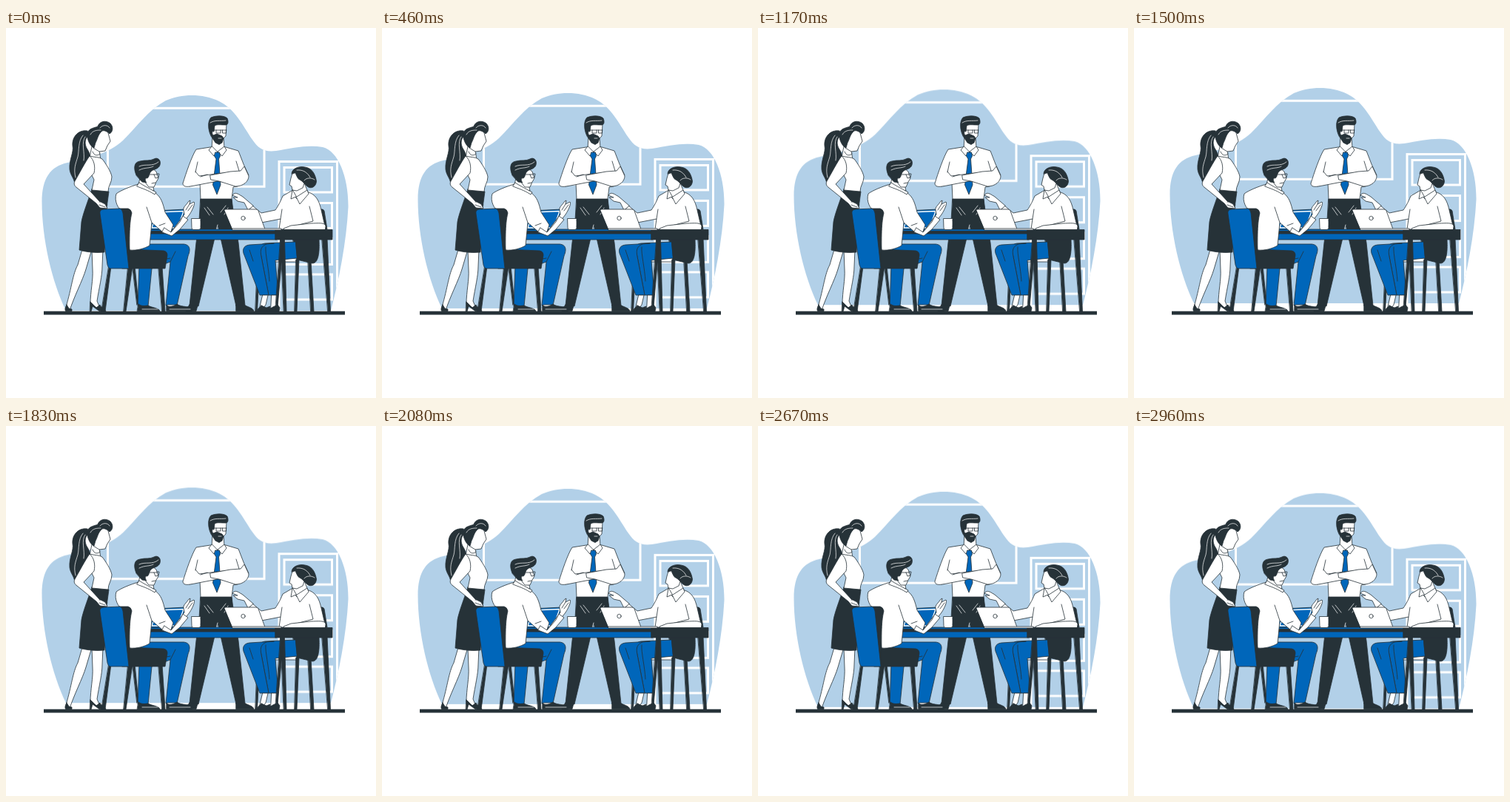
An HTML page that plays this animation: 500 by 500 pixels, repeating every 3000 ms.

```html
<!DOCTYPE html>
<html lang="en">
<head>
<meta charset="utf-8">
<title>Team meeting</title>
<style>
html, body { margin: 0; width: 100%; height: 100%; overflow: hidden; background: #fff; }
svg { display: block; width: 100vw; height: 100vh; }
.room { animation: float 3s linear infinite; }
@keyframes float { 50% { transform: translateY(-10px); } }
.trim { fill: none; stroke: #fff; stroke-width: 3; }
.w, .d, .b, .l { stroke: #263238; stroke-width: .8; stroke-linejoin: round; stroke-linecap: round; }
.w { fill: #fff; }
.d { fill: #263238; }
.b { fill: #0066ba; }
.l { fill: none; }
.h { fill: none; stroke: #fff; stroke-width: .7; stroke-linecap: round; }
</style>
</head>
<body>
<svg viewBox="0 0 500 500">
<defs>
  <clipPath id="cloud"><path id="blob" d="M81 382C62 343 48.500 285 48.500 235C48.500 203 60 187 83 182C112 176 138 170 158 152C178 132 192 111 216 98C238 88.500 266 88.500 288 99C310 110 320 132 333 151C341 163 349 168 365 166C388 162 408 157.500 428 161C449 166 463 202 462.500 242C460 290 450 340 439 382Z"/></clipPath>
</defs>

<g class="room">
  <use href="#blob" fill="#b2d0e8"/>
  <g class="trim" clip-path="url(#cloud)">
    <rect x="137.500" y="108.300" width="211.500" height="106"/>
    <path d="M369 384V180.500H447.500V384"/>
    <rect x="376" y="188.500" width="64.500" height="33.500"/>
    <rect x="376" y="236.500" width="64.500" height="34"/>
    <rect x="376" y="284.500" width="64.500" height="35"/>
    <rect x="376" y="333" width="64.500" height="34"/>
  </g>
</g>

<rect x="51" y="382.700" width="407" height="4.800" fill="#263238"/>

<!-- standing man -->
<g>
  <path class="d" d="M263 231H305L309 262L314 290L323 375L311 376L291 288L286 266L281 288L260 376L248 375L257 290L261 260Z"/>
  <path class="d" d="M248 374L259 375L257 382.500H243C241 378 246 378 248 374ZM311 374L322 374C326 377 334 378 335 382.500H311Z"/>
  <path class="h" d="M268 243L275 253M272 242L280 252M297 240L290 249M300 243L295 252M286 266L284 273"/>
  <path class="w" d="M276 161L257 164C251 173 243 197 239 210L248 214L262 209L263 231H305L307 215L313 214L328 199L321 184L314 166L297 161Z"/>
  <path class="w" d="M279 146L278 163L286 169L295 162L294 148Z"/>
  <path class="w" d="M278 130L279 147L288 155L297 146L298 130Z"/>
  <path class="d" d="M277 146C273 138 272 126 277 121C284 118 295 118 299 122C301 127 300 131 297 131C290 131 285 130 282 132L281 140C278 139 277 142 280 145L285 143L292 146L294 149L292 155L288 157.500L283 155L279 149Z"/>
  <path class="h" d="M276 128C282 124 289 126 297 125M287 149H291"/>
  <path class="l" d="M281 138H298M284 138V142H290V138M292.500 138V142H297.500V138"/>
  <path class="w" d="M278 160L274 165L281 173L286 167L292 173L298 165L295 160L286 167Z"/>
  <path class="b" d="M283 168H288.500L289.500 173L287.500 177L290 212L285 225L279.500 212L284 177L281.500 173Z"/>
  <path class="w" d="M239 210C239 215 244 215 252 213.500L286 207L303 209L312 201L303 195L284 197L261 200L256 194"/>
  <path class="w" d="M276 199L303 194L317 193L322 187L328 200C328 207 321 214 310 214L288 207L277 205Z"/>
  <path class="l" d="M256 195L259 181M315 193L311 180M263 201L272 198M263 232V236M305 232V236"/>
</g>

<!-- far chair and seated woman -->
<g>
  <path class="d" d="M421 245H428Q430.500 246 430.500 250L434 272H422Z"/>
  <path class="w" d="M339 311H395V316H339Z"/>
  <path class="d" d="M340 316H343L339.500 383H337ZM392 313H396L393 383H390ZM408 313H412L416 383H412Z"/>
  <path class="d" d="M388 286H423C424 304 422 318 414 318L393 313Z"/>
  <path class="b" d="M391 289L350 291C339 293 343 301 345 309L355 361H368L364 314L393 311Z"/>
  <path class="b" d="M362 291L329 293C320 294 319 301 322 307L343 361H355L345 309C343 299 345 295 352 292Z"/>
  <path class="l" d="M351 296C350 305 355 324 356 342M329 300L334 315"/>
  <path class="w" d="M347 361H354L351 374L347 379L343 378ZM359 361H366L366 376L358 379Z"/>
  <path class="d" d="M345 375L352 378L357 376L356 383H340C339 379 343 378 345 375ZM361 377L367 374L370 378L369 383H352C352 380 358 379 361 377Z"/>
  <path class="w" d="M386 220L374 227C370 237 366 243 364 246L345 250L333 240L327 246L345 263L371 258L369 272H432L426 246C423 232 418 225 409 222Z"/>
  <path class="w" d="M334 240L320 228C315 225 311 222 308 224L306 226L313 229L307 229L313 234L322 236L327 246Z"/>
  <path class="w" d="M389 213L387 223L393 231L408 222L403 209Z"/>
  <path class="w" d="M388 193L385 203L383 212L386 214L387 219L393 220L401 216L405 204L399 191Z"/>
  <path class="d" d="M386 197C386 190 396 186 404 188C413 189 418 197 419.500 207C419 215 412 218 407 214L403 210L400 207L397 205C394 204 393 200 391 196Z"/>
  <path class="h" d="M403 206C406 202 413 202 417 205M393 192C402 191 408 196 411 202"/>
  <path class="w" d="M387 219L385 231L392 228L397 238L409 224L407 219L393 228Z"/>
  <path class="l" d="M371 258L373 245M410 241L415 261L388 268"/>
  <path class="w" d="M432 268C432 262 421 264 412 264L385 267L375 271L376 273H431Z"/>
</g>

<!-- table -->
<g>
  <path class="b" d="M193 272H366V286H193Z"/>
  <path class="d" d="M193 274.500H366V278H193Z"/>
  <path class="d" d="M364 272.500H441V286H364Z"/>
  <path class="d" d="M371 284H376.500L379 383H375.500ZM427 284H434L438.500 383H435ZM371 285H375L366.500 383H364Z"/>
  <path class="w" d="M295 246Q295 245 297 245H338Q340 245 341 247L350 272H306Z"/>
  <path class="w" d="M306 271H372V273H306Z"/>
  <circle class="w" cx="320.500" cy="257" r="2.700"/>
  <path class="w" d="M251 257.500H263V270Q263 272.500 260 272.500H253Q251 272.500 251 270Z"/>
  <path class="l" d="M263 260C268 259 268 268 263 268"/>
</g>

<!-- standing woman -->
<g>
  <path class="w" d="M104 296L97 320C90 333 89 350 81 377L86 382C91 365 104 340 108 326L116 299Z"/>
  <path class="w" d="M116 299L117 326C118 340 114 356 114 373L128 381L123 369C126 350 130 335 130 322L131 299Z"/>
  <path class="d" d="M82 374L85 379L89 380V382.500H80.500C79 379 81 377 82 374ZM114 370L122 378L127 374C128 378 133 379 135 382.500H126L117 376L115 383H113.500Z"/>
  <path class="d" d="M116 218L139 221L136 243L133 303C121 304 109 303 99 300L102 262C104 251 109 239 116 218Z"/>
  <path class="d" d="M110 139C99 137 89 146 90 159C92 168 85 178 86 191C87 199 91 201 93 210C104 207 106 197 111 190C117 180 114 170 110 164C106 158 106 150 111 146Z"/>
  <path class="h" d="M104 145C97 153 99 166 97 174C94 184 91 190 94 202M107 147C101 155 107 168 105 179"/>
  <path class="w" d="M116 160L113 175L128 179L126 164Z"/>
  <path class="w" d="M112 148L118 162L126 167L134 166L137 159L141 153L137 138L122 136Z"/>
  <path class="d" d="M110 142C112 135 120 135 124 133C126 126 135 124 141 129C145 133 145 140 140 143C137 140 133 138 130 139C124 144 124 150 121 155L119 162C114 160 111 153 110 148Z"/>
  <path class="h" d="M127 135C131 130 138 131 140 135M114 144C117 138 124 138 128 138"/>
  <path class="l" d="M117 167C119 173 124 173 127 170"/>
  <path class="w" d="M113 173C120 175 126 174 130 177C134 182 142 194 143 201C143 209 138 213 138 221L116 219L119 205L112 191Z"/>
  <path class="w" d="M113 173C107 181 99 197 93 207C91 211 93 214 96 216L122 237L127 243L137 244L134 238L126 234L105 211L119 196C121 187 119 178 113 173Z"/>
  <path class="l" d="M126 235L133 234L137 239M126 239L134 242"/>
</g>

<!-- seated man and near chair -->
<g>
  <path class="d" d="M139 322H142L134 383H129ZM165 322H171L162 383H159Z"/>
  <path class="d" d="M206 322H211L215 383H211ZM171 322H174L179 371L177 374Z"/>
  <path class="b" d="M201 247L243 245L234 272H193Z"/>
  <path class="h" d="M204 249L240 247.500L232 270H197Z" style="stroke-width:1.300"/>
  <path class="b" d="M168 301L194 292H240C250 293 249 301 246 308L231 375H216L222 316L197 325L192 376H178L180 320Z"/>
  <path class="l" d="M197 325C200 317 210 313 222 311M222 316L229 302"/>
  <path class="w" d="M180 376H190L192 380H179ZM218 374H230L231 379H219Z"/>
  <path class="d" d="M179 373C184 377 189 375 192 375C197 378 206 378 208 382.500H177.500ZM217 375C222 378 228 375 231 373C237 378 249 375 253 380Q253 382.500 250 382.500H217Z"/>
  <path class="h" d="M184 380H205M221 380H249"/>
  <path class="d" d="M166 299L213 301Q218 302 218 307L215 325H164Z"/>
  <path class="w" d="M179 211C168 214 154 220 149 224C146 234 151 244 159 250L167 300C177 301 187 298 194 294L197 263L212 276L222 278L226 266L215 249C212 237 210 229 202 223L191 215Z"/>
  <path class="w" d="M182 198L179 212L194 219L200 220L197 207Z"/>
  <path class="w" d="M191 190L187 207L193 215L200 215L203 208L206 203L203 194L197 189Z"/>
  <path class="d" d="M176 199C172 189 173 181 181 180C189 178 194 180 200 177C205 174 210 179 208 185C207 190 200 191 197 193C193 196 194 201 191 203C187 202 188 207 190 209L184 208Z"/>
  <path class="h" d="M180 187C188 183 198 188 206 181M180 192C188 188 194 190 199 187"/>
  <path class="l" d="M194 198H204M200 198L202 203L206 202L207 197L204 197M197 210L202 209"/>
  <path class="w" d="M180 209C186 213 192 216 203 222L201 225C192 219 184 217 177 214Z"/>
  <path class="w" d="M221 278L241 252L240 246C239 242 244 239 247 234L249 233L248 238L254 235C256 237 252 246 248 252L231 274L224 279Z"/>
  <path class="w" d="M214 270L223 276L235 262L239 254L246 259L235 272L224 281L211 276Z"/>
  <path class="l" d="M197 263L190 242M248 238L243 246M252 239L246 247M207 267L215 264"/>
  <path class="d" d="M153 244H165Q169 245 170 250C166 267 167 285 167 325H157Z"/>
  <path class="b" d="M131 245L154 244Q157 245 158 250L166 325H141Q138 325 137 320L127 251Q126 246 131 245Z"/>
</g>
</svg>
</body>
</html>
```
